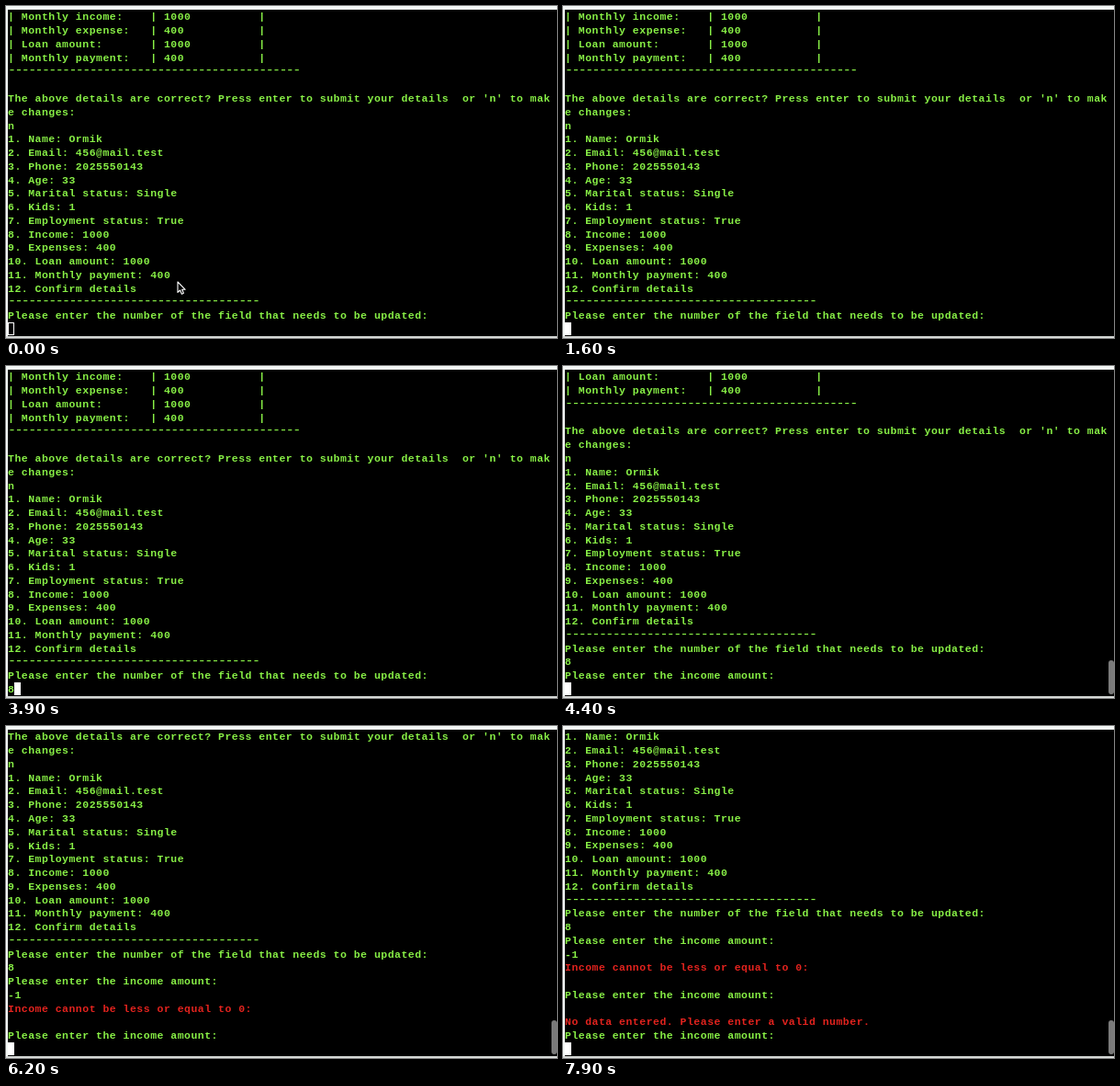
Write an HTML page that moves like this. It is 600 px wide and 361 px high and loops after 8000 ms.

```html
<!DOCTYPE html>
<html lang="en">
<head>
<meta charset="utf-8">
<title>Loan details terminal</title>
<style>
  :root { --row: 14.77px; --col: 7.387px; --loop: 8s; }
  html, body { margin: 0; width: 100%; height: 100%; overflow: hidden; background: #f3f7f5; }
  .stage { position: relative; width: 600px; height: 361px; overflow: hidden; }
  .edge { position: absolute; left: 0; top: 359px; width: 600px; height: 2px; background: #d6d9d7; }
  .screen {
    position: absolute; left: 2px; top: 4px; width: 598px; height: 355px;
    overflow: hidden; background: #000; color: #88f046;
    font: bold 11.5px/var(--row) "Liberation Mono", "Courier New", monospace;
  }
  pre {
    position: absolute; left: 0; top: 1.4px; margin: 0; font: inherit;
    letter-spacing: calc(var(--col) - 0.6001em);
    animation: scroll var(--loop) step-end infinite;
  }
  .rule {
    font-size: 15px; font-weight: normal; line-height: 0;
    letter-spacing: calc(var(--col) - 0.6001em);
  }
  .error { color: #e3231e; }
  .key { visibility: hidden; animation: var(--loop) step-end infinite; }
  .eight { animation-name: eight; }
  .minus { animation-name: minus; }
  .one { animation-name: one; }
  .caret {
    position: absolute; left: 0; top: 340px; width: 7px; height: 14px;
    box-sizing: border-box; border: 1px solid #fff;
    animation: focus var(--loop) step-end infinite, caret var(--loop) step-end infinite;
  }
  .thumb {
    position: absolute; left: 591.5px; top: 316px; width: 6px; height: 37px;
    border-radius: 3px; background: #7a7a7a; opacity: 0;
    animation: thumb var(--loop) linear infinite;
  }
  .mouse {
    position: absolute; left: 0; top: 0; overflow: visible;
    animation: mouse var(--loop) ease-in-out infinite;
  }

  @keyframes scroll {
    0% { margin-top: 0; }
    53.75% { margin-top: calc(-2 * var(--row)); }
    76.25% { margin-top: calc(-6 * var(--row)); }
    95%, 100% { margin-top: calc(-9 * var(--row)); }
  }
  @keyframes eight { 43.75%, 100% { visibility: visible; } }
  @keyframes minus { 71.25%, 100% { visibility: visible; } }
  @keyframes one { 73.75%, 100% { visibility: visible; } }
  @keyframes focus {
    0% { background: transparent; }
    7.5%, 100% { background: #fff; }
  }
  @keyframes caret {
    0%, 53.75%, 76.25%, 100% { left: 0; }
    43.75%, 71.25% { left: var(--col); }
    73.75% { left: calc(2 * var(--col)); }
  }
  @keyframes thumb {
    0%, 53.74%, 63.1%, 76.24%, 86.9%, 94.99% { opacity: 0; }
    53.75%, 60%, 76.25%, 83.75%, 95%, 100% { opacity: 1; }
  }
  @keyframes mouse {
    0%, 1% { transform: translate(187px, 300px); visibility: visible; }
    7%, 8.9% { transform: translate(114.5px, 343px); }
    10.6% { transform: translate(108px, 362px); visibility: visible; }
    10.7%, 100% { transform: translate(108px, 362px); visibility: hidden; }
  }
</style>
</head>
<body>
<div class="stage">
  <div class="screen">
<pre>| Monthly income:    | 1000          |
| Monthly expense:   | 400           |
| Loan amount:       | 1000          |
| Monthly payment:   | 400           |
<span class="rule">-------------------------------------------</span>

The above details are correct? Press enter to submit your details  or 'n' to mak
e changes:
n
1. Name: Ormik
2. Email: 456@mail.test
3. Phone: 2025550143
4. Age: 33
5. Marital status: Single
6. Kids: 1
7. Employment status: True
8. Income: 1000
9. Expenses: 400
10. Loan amount: 1000
11. Monthly payment: 400
12. Confirm details
<span class="rule">-------------------------------------</span>
Please enter the number of the field that needs to be updated:
<span class="key eight">8</span>
Please enter the income amount:
<span class="key minus">-</span><span class="key one">1</span>
<span class="error">Income cannot be less or equal to 0:</span>

Please enter the income amount:

<span class="error">No data entered. Please enter a valid number.</span>
Please enter the income amount:
</pre>
    <div class="caret"></div>
    <div class="thumb"></div>
  </div>
  <div class="edge"></div>
  <svg class="mouse" width="10" height="15">
    <path d="M0 0V11.4L2.6 9 4.4 13.2 6.4 12.3 4.7 8.3H8.2Z" fill="#000" stroke="#fff" stroke-width="1.1" stroke-linejoin="round"/>
  </svg>
</div>
</body>
</html>
```
